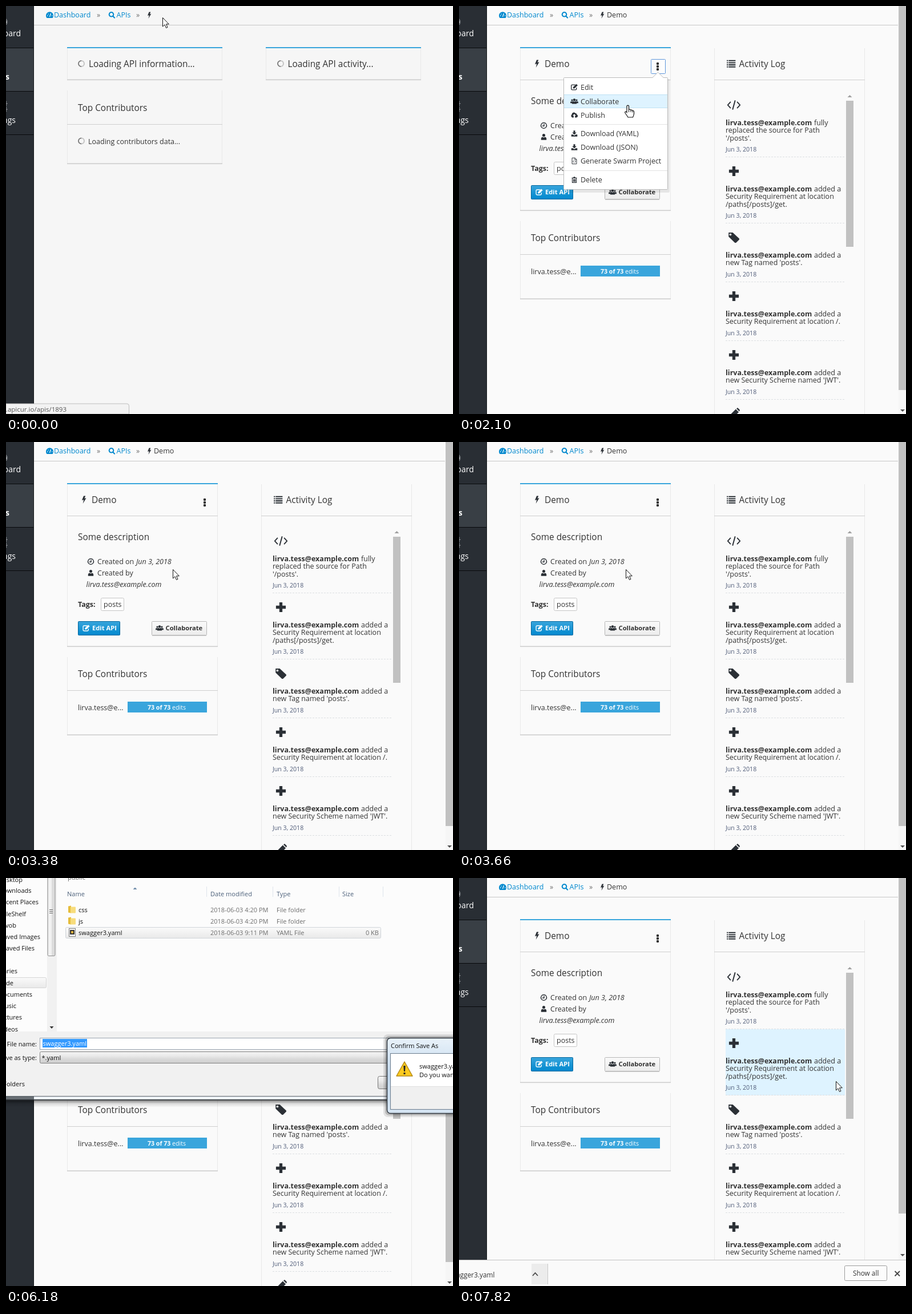
Animation, 783 px wide and 715 px high, one loop 8000 ms. Source, as an HTML page:

```html
<!DOCTYPE html>
<html lang="en">
<head>
<meta charset="utf-8">
<title>API dashboard</title>
<style>
html, body { margin: 0; width: 100%; height: 100%; overflow: hidden; background: #fafafa; }
svg { display: block; width: 783px; height: 715px; }
text { font: 12.5px "Open Sans", "Noto Sans", sans-serif; fill: #333; white-space: pre; }
.h { font-size: 15.4px; }
.b { font-weight: 700; }
.i { font-style: italic; }
.btn { font-size: 11.2px; font-weight: 700; }
.date { font-size: 10.6px; fill: #4f5b78; }
.url { font-size: 11.5px; fill: #555; }
.bar { font-size: 11.8px; }
.edits { font-size: 10.6px; }
.link { fill: #0088ce; }
.win { font-size: 11px; fill: #111; }
.dim { fill: #6d6d6d; }
.col { fill: #4c607a; }
.white { fill: #fff; }
.side { font-size: 14px; fill: #fff; }
.end { text-anchor: end; }
</style>
</head>
<body>
<svg id="stage" viewBox="0 0 783 715"></svg>
<script>
(() => {
const LOOP = 8000;
const EMAIL = 'lirva.tess@example.com';
const DARK = '#292e34', BLUE = '#39a5dc', INK = '#2b3036';

const text = (x, y, s, cls = '') => `<text x="${x}" y="${y}" class="${cls}">${s}</text>`;
const rect = (x, y, w, h, fill, more = '') => `<rect x="${x}" y="${y}" width="${w}" height="${h}" fill="${fill}" ${more}/>`;
const box = (x, y, w, h, fill, stroke, r = 0) => rect(x + .5, y + .5, w - 1, h - 1, fill, `stroke="${stroke}" rx="${r}"`);
const path = (d, fill, more = '') => `<path d="${d}" fill="${fill}" ${more}/>`;
const group = (id, body) => `<g id="${id}">${body}</g>`;
const gradient = (id, ...colors) => `<linearGradient id="${id}" x2="0" y2="1">${colors.map((c, i) =>
  `<stop offset="${i / (colors.length - 1)}" stop-color="${c}"/>`).join('')}</linearGradient>`;

// Icons are drawn around 0,0 in a box of about 14 units.
const line = (d, w = 1.6) => `<path d="${d}" fill="none" stroke="currentColor" stroke-width="${w}"/>`;
const solid = d => `<path d="${d}" fill="currentColor"/>`;
const person = (x, s) => `<g transform="translate(${x}) scale(${s})">${solid('M-3-3.5a3 3 0 1 1 6 0a3 3 0 1 1-6 0M-5.5 6V3Q-5 0-2.5 0Q0 2 2.5 0Q5 0 5.5 3V6Z')}</g>`;
const ICONS = {
  bolt: solid('M-.5-6.5L-3.5 1L-.3.3L-1.8 7L4-2.8L.9-2.2L2.8-6.5Z'),
  list: solid('M-7-6h2v2h-2zM-7-2.5h2v2h-2zM-7 1h2v2h-2zM-7 4.5h2v2h-2zM-4-6H7.5v2H-4zM-4-2.5H7.5v2H-4zM-4 1H7.5v2H-4zM-4 4.5H7.5v2H-4z'),
  code: line('M-4.5-4.5L-8.5 0L-4.5 4.5M4.5-4.5L8.5 0L4.5 4.5M1.8-6.5L-1.8 6.5', 1.5),
  plus: solid('M-2-6.5H2V-2H6.5V2H2V6.5H-2V2H-6.5V-2H-2Z'),
  tag: solid('M-7-6.5H-1.5L7 1.5Q7.5 2.3 7 3L3 7Q2 7.5 1.2 7L-7-1ZM-4.6-5.2a1.4 1.4 0 1 0 .01 0Z'),
  pencil: solid('M-7 7L-6 2.5L2.5-6L6.5-2L-2 6ZM3.4-6.8L5-8L8-5L7.2-3Z'),
  clock: line('M0-5a5 5 0 1 0 .01 0M.5-3V.8H-2.5', 1.4),
  user: person(0, .95),
  users: person(-4.5, .62) + person(4.5, .62) + person(0, .85),
  edit: line('M2-4.5H-4Q-6-4.5-6-3V4Q-6 5.5-4 5.5H2.5Q4.2 5.5 4.2 4V1', 1.5) + solid('M-2.5 2.8V.2L4-6L6.8-3.4L.3 2.8Z'),
  cloud: solid('M-4 5A3.4 3.4 0 0 1-5-1A4 4 0 0 1 2.2-3.5A2.7 2.7 0 0 1 5-.8A3 3 0 0 1 4 5H1.3V1.5H3.3L0-2L-3.3 1.5H-1.3V5Z'),
  down: solid('M-1.7-6H1.7V-2H4.4L0 2.4L-4.4-2H-1.7ZM-6 2H-2.8L0 4L2.8 2H6V6H-6Z'),
  file: line('M-4.5-6H1.5L4.5-3V6H-4.5ZM1-6V-2.5H4.5M-1-.8L-2.7 1.2L-1 3.2M1-.8L2.7 1.2L1 3.2', 1.1),
  trash: line('M-4-2.8V5.5H4V-2.8M-1.6-1.5V4M.1-1.5V4M1.8-1.5V4', 1.3) + solid('M-5-4.2H-2L-1.3-6H1.3L2-4.2H5V-2.8H-5Z'),
  gauge: solid('M-5 5A6.5 6.5 0 1 1 5 5Z') + '<path d="M0 3L2-3M-4.4 1h1.5M-3-2.4l1 1M3.6 1h1.3" stroke="#fafafa" stroke-width="1.3"/>',
  search: line('M-1-5a3.8 3.8 0 1 0 .01 0M1.8 1.8L5.2 5.2', 2),
  gear: line('M-4 0a4 4 0 1 0 8 0a4 4 0 1 0-8 0', 3) + line('M0-7V-4M0 4V7M4 0H7M3-3L5-5M3 3L5 5', 2.5)
};
const icon = (name, x, y, s = 1, color = INK) => `<g transform="translate(${x} ${y}) scale(${s})" color="${color}">${ICONS[name]}</g>`;

const card = (x, y, w, bottom, split, accent) =>
  path(`M${x + .5} ${y}V${bottom}M${x + w - .5} ${y}V${bottom}`, 'none', 'stroke="#e9e9e9"') +
  rect(x, split, w, 1, '#cfcfcf') + rect(x, bottom - .5, w, 1.6, '#cdcdcd') +
  (accent ? rect(x, y, w, 2, BLUE) : '');

const sidebar = rect(0, 0, 49, 715, DARK) + rect(0, 74, 48, 75, '#393f45') +
  [73, 149, 225].map(y => rect(0, y, 48, 1, '#07090b')).join('') + rect(48, 0, 1, 715, '#15181b') +
  icon('gauge', -5, 27, 1.2, '#72767b') + icon('gear', -3, 171, .8, '#72767b') + icon('gear', -3, 181, .8, '#72767b') +
  text(26, 53, 'Dashboard', 'side end') + text(6, 129, 'APIs', 'side end b') + text(17, 205, 'Settings', 'side end');

const crumbs = icon('gauge', 76.5, 16, 1, '#0088ce') + text(84, 20, 'Dashboard', 'link') + text(159, 20, '»', 'dim') +
  icon('search', 185.5, 16, 1, '#0088ce') + text(193.5, 20, 'APIs', 'link') + text(228, 20, '»', 'dim') + icon('bolt', 251, 16, .85);

const spinner = (x, y) => `<g transform="translate(${x} ${y})"><g class="spin"><circle r="5" fill="none" stroke="#c4c4c4" stroke-width="2"/>
  <path d="M0-5A5 5 0 0 0 0 5" fill="none" stroke="#777" stroke-width="1.6"/></g></g>`;

const loading = rect(49, 0, 734, 715, '#f6f6f6') + rect(49, 33, 734, 1, '#c6c6c6') + crumbs +
  card(107, 72, 272, 129, 129, true) + card(455, 72, 272, 129, 129, true) + card(107, 148, 272, 276, 207) +
  spinner(132, 101) + text(145, 106.5, 'Loading API information...', 'h') +
  spinner(481, 101) + text(493.5, 106.5, 'Loading API activity...', 'h') +
  text(126, 183.5, 'Top Contributors', 'h') + spinner(132, 236.5) + text(144, 241.5, 'Loading contributors data...');

const LOG = [
  ['code', 'fully', 'replaced the source for Path', "'/posts'."],
  ['plus', 'added a', 'Security Requirement at location', '/paths[/posts]/get.'],
  ['tag', 'added a', "new Tag named 'posts'."],
  ['plus', 'added a', 'Security Requirement at location /.'],
  ['plus', 'added a', "new Security Scheme named 'JWT'."],
  ['pencil', 'added a', 'new Path.']
];
let nextY = 149;
const log = LOG.map(([name, verb, ...lines]) => {
  const y = nextY, last = y + 60 + lines.length * 13.4;
  nextY = Math.round(last + 29.5);
  return icon(name, 481.5, y + 24.5, name === 'code' ? 1.25 : 1.32) +
    text(467, y + 60, EMAIL, 'b') + text(622, y + 60, verb) +
    lines.map((s, i) => text(467, y + 60 + (i + 1) * 13.4, s)).join('') +
    text(467, last + 19.5, 'Jun 3, 2018', 'date') +
    path(`M467 ${nextY - .5}H676`, 'none', 'stroke="#dcdfe2" stroke-dasharray="3 2"');
}).join('');

const page = rect(49, 0, 734, 715, '#fafafa') + rect(49, 33, 720, 1, '#c6c6c6') + crumbs + text(259, 20, 'Demo') +
  card(107, 72, 264, 358, 129, true) + card(107, 377, 264, 513, 435) + card(447, 74, 264, 760, 129) +
  icon('bolt', 136.5, 101) + text(150, 106.5, 'Demo', 'h') + text(126, 172, 'Some description', 'h') +
  icon('clock', 148.5, 209.5) + text(160, 213.5, 'Created on') + text(228, 213.5, 'Jun 3, 2018', 'i') +
  icon('user', 148.5, 229.5, .9) + text(160, 233.5, 'Created by') + text(140.5, 253.5, EMAIL, 'i') +
  text(126, 289, 'Tags:', 'b') + box(166, 273, 41, 23, '#fff', '#c4c4c4', 2) + text(171, 289, 'posts') +
  box(126, 314, 74, 25, 'url(#blue)', '#00659c', 1) + icon('edit', 140.5, 326, .9, '#fff') + text(151, 330, 'Edit API', 'btn white') +
  box(255, 314, 97, 25, 'url(#grey)', '#b7b7b7', 1) + rect(256, 339, 95, 1, '#ccc') + icon('users', 269, 326, .88) + text(279.5, 330, 'Collaborate', 'btn') +
  text(126, 411.5, 'Top Contributors', 'h') + text(126, 469.5, EMAIL.slice(0, 12) + '...') +
  rect(213, 455, 139, 19, BLUE) + text(248, 468.5, '<tspan class="b">73 of 73</tspan> edits', 'edits white') +
  icon('list', 476.5, 101, 1.05) + text(490.5, 106.5, 'Activity Log', 'h') +
  group('logHover', rect(467, 265, 209, 116, '#def3ff')) + log +
  path('M680.5 160L684.5 156L688.5 160Z', '#a0a0a0') + rect(678, 166, 13, 256, '#c1c1c1') +
  group('focus', box(336, 93, 26, 26, '#fdfdfd', '#5e96db', 1)) +
  [100, 105, 110].map(y => rect(346, y - 1, 4, 4, '#222', 'rx="1"')).join('') +
  rect(770, 0, 13, 715, '#f6f6f6') + group('thumb', rect(770, 0, 13, 673, '#c1c1c1')) +
  group('arrow', path('M773 707H781L777 711Z', '#505050'));

const MENU = [['edit', 'Edit', 142], ['users', 'Collaborate', 167], ['cloud', 'Publish', 191], ['down', 'Download (YAML)', 223.5],
  ['down', 'Download (JSON)', 247.5], ['file', 'Generate Swarm Project', 271.5], ['trash', 'Delete', 304.5]];
const menu = rect(185, 128, 184, 199, '#000', 'opacity=".08" rx="2"') + box(183, 125, 183, 197, '#fff', '#bbb', 1) +
  path('M338.5 126L348.5 116L358.5 126', '#fff', 'stroke="#bbb"') + rect(339, 126, 19, 2, '#fff') +
  group('menuHover', rect(184, -12, 181, 24, '#def3ff') + rect(184, -12, 181, 1, '#bee1f4') + rect(184, 11, 181, 1, '#bee1f4')) +
  rect(184, 207, 181, 1, '#e2e2e2') + rect(184, 288, 181, 1, '#e2e2e2') +
  MENU.map(([name, s, y]) => icon(name, 202, y, .88) + text(213, y + 4.5, s)).join('');

const linkBar = path('M0 697H212Q215.5 697 215.5 701V715H0Z', '#f3f3f3', 'stroke="#bdbdbd"') +
  group('url', text(106, 711, 'studio.apicur.io/apis/1893', 'url end'));

const PLACES = [['Desktop', 29, 6.5], ['Downloads', 44.5, 26], ['Recent Places', 57, 46], ['FileShelf', 35, 66.5], ['vob', 18, 87],
  ['Saved Images', 60, 107], ['Saved Files', 50, 127], ['Libraries', 20, 167], ['Code', 13, 188], ['Documents', 46, 208],
  ['Music', 18, 228], ['Pictures', 28, 248], ['Videos', 21, 268.5]];
const folder = y => path(`M109 ${y - 6}L114 ${y - 7}V${y + 6}L109 ${y + 5}Z`, '#e6bd3c') + rect(113, y - 5, 9, 11, '#f7dc7c', 'rx="1"');
const row = (y, name, when, kind) => text(127, y + 4, name, 'win') + text(358, y + 4, when, 'win dim') + text(474, y + 4, kind, 'win dim');
const files = text(108, 2.5, 'public', 'win dim') + folder(55.5) + folder(75.5) +
  group('picked', box(104, 86, 553, 20, 'url(#pick)', '#d0d5da', 2)) +
  row(55.5, 'css', '2018-06-03 4:20 PM', 'File folder') + row(75.5, 'js', '2018-06-03 4:20 PM', 'File folder') +
  box(110, 88, 12, 15, '#fff', '#777') + rect(112, 91, 8, 8, '#333') + rect(114, 93, 4, 4, '#e2b13c') +
  row(96, 'swagger3.yaml', '2018-06-03 9:11 PM', 'YAML File') + text(653, 100, '0 KB', 'win dim end');
const noFiles = text(108, 2.5, 'geek', 'win dim') + text(396, 65.5, 'No items match your search.', 'win dim');
const fileName = (s, w) => rect(64, 282, w, 15, '#3399ff') + text(64.5, 293.5, s, 'win white');

const dialog = rect(0, 389, 783, 13, 'url(#shade)') + rect(0, 0, 783, 383, '#fcfcfc') + rect(0, 269, 783, 113, '#f1f1f1') +
  box(-5, 174, 76, 19, 'url(#pick)', '#d5d5d5', 2) + PLACES.map(([s, x, y]) => text(x, y, s, 'win end')).join('') +
  rect(72, 0, 17, 269, '#f1f1f1') + box(72.5, -5, 14, 142, '#dcdcdc', '#8e8e8e', 2) + rect(74, 0, 6, 136, '#f1f1f1') +
  [55, 58, 61].map(y => rect(76, y, 6, 1, '#666')).join('') + path('M76.5 260H83.5L80 264Z', '#333') +
  [351, 467, 583, 660].map(x => rect(x, 15, 1, 18, '#dfe5ec')).join('') + path('M222.5 20L226 16.5L229.5 20Z', '#6d8aa8') +
  text(107, 31.5, 'Name', 'win col') + text(358, 31.5, 'Date modified', 'win col') + text(474, 31.5, 'Type', 'win col') + text(589, 31.5, 'Size', 'win col') +
  group('noFiles', noFiles) + group('files', files) +
  text(54, 294.5, 'File name:', 'win end') + text(54, 318.5, 'Save as type:', 'win end') + text(33, 365, 'Hide Folders', 'win end') +
  box(59, 280, 740, 21, '#fff', '#9aa5b0') + box(59, 304, 740, 21, 'url(#combo)', '#808080', 2) + text(62.5, 318.5, '*.yaml', 'win') +
  group('nameA', fileName('Demo.yaml', 60)) + group('nameB', fileName('swagger3.yaml', 78)) +
  box(651, 347, 83, 23, 'url(#combo)', '#777', 3) + group('glow', rect(652.5, 348.5, 80, 20, 'none', 'stroke="#3cbbe4" stroke-width="2" rx="2"')) +
  text(681, 362, 'Save', 'win') + box(747, 347, 83, 23, 'url(#combo)', '#777', 3) + text(772, 362, 'Cancel', 'win') +
  rect(0, 382, 783, 1, '#596068') + rect(0, 383, 783, 5, '#edf2f7') + group('active', rect(0, 383, 783, 5, '#a9cbe6')) + rect(0, 388, 783, 1.5, '#30353a') +
  rect(0, 383, 49, 5, '#23292f', 'opacity=".65"');

const confirmBox = rect(661, 274, 130, 145, '#000', 'opacity=".1" rx="8"') + rect(664, 277, 130, 139, '#000', 'opacity=".18" rx="7"') +
  rect(667.5, 280.5, 130, 132, 'url(#glass)', 'stroke="#2f363e" stroke-width="1.5" rx="6"') +
  box(673, 307, 130, 99, '#f0f0f0', '#6b7c8d') + rect(674, 308, 120, 57, '#fff') + rect(674, 365, 120, 1, '#dfdfdf') +
  text(674, 297.5, 'Confirm Save As', 'win') +
  path('M698 322L712 347H684Z', '#fdca1e', 'stroke="#b58a18" stroke-linejoin="round" stroke-width="1.5"') +
  path('M696.3 329H699.7L699 339H697ZM696.5 341H699.5V344H696.5Z', '#222') +
  text(724, 334, 'swagger3.yaml already exists.', 'win') + text(724, 348.5, 'Do you want to replace it?', 'win');

const downloads = rect(0, 670, 783, 45, '#fafafa') + rect(0, 669, 783, 1, '#c3c3c3') + rect(127, 676, 28, 36, '#ececec') + rect(155, 676, 1, 36, '#c8c8c8') +
  text(62.5, 700, 'swagger3.yaml', 'bar end') + path('M129 697L133.5 692L138 697', 'none', 'stroke="#444" stroke-width="1.7"') +
  box(675, 679, 75, 27, '#fcfcfc', '#9c9c9c', 2) + text(690, 697, 'Show all', 'bar') +
  path('M763.5 689L772 697.5M772 689L763.5 697.5', 'none', 'stroke="#444" stroke-width="1.8"');

const pointer = path('M.5.5V16L4 12.7L6.5 18.5L9 17.4L6.5 11.8H11.3Z', '#fff', 'stroke="#111"');
const hand = path('M-2 1.2Q0-.8 1.5 1.2V7.5L3 7Q4.5 7 5 8.5Q7 7.5 8 9.5Q10.5 9 10.5 11.5V15Q10 18 8.5 21H0Q-2 17.5-5 13.5Q-6 11-3.5 11L-2 12.5Z', '#fff', 'stroke="#111" stroke-width="1.2"') +
  path('M1.5 7V12M5 8.5V12M8 9.5V12.5', 'none', 'stroke="#111"');

document.getElementById('stage').innerHTML = '<defs>' + gradient('blue', BLUE, '#0088ce') + gradient('grey', '#fafafa', '#ececec') +
  gradient('combo', '#f3f3f3', '#ebebeb', '#d8d8d8', '#cfcfcf') + gradient('pick', '#fafafa', '#e9e9e9') +
  gradient('glass', '#e9f2fa', '#c2d8ec', '#d6e5f3') + gradient('shade', 'rgba(0,0,0,.5)', 'rgba(0,0,0,.12)', 'rgba(0,0,0,0)') + '</defs>' +
  group('page', page) + group('loading', loading) + sidebar + group('menu', menu) + group('linkBar', linkBar) +
  group('dialog', dialog) + group('confirm', confirmBox) + group('downloads', downloads) +
  group('cursor', group('ring', '<circle r="9.5" fill="none" stroke="#111" stroke-width="1.5"/>') + group('pointer', pointer) + group('hand', hand));

const $ = id => document.getElementById(id);
const spins = document.querySelectorAll('.spin');
const show = (id, on) => { $(id).style.display = on ? '' : 'none'; };
const shift = (id, x, y) => $(id).setAttribute('transform', `translate(${x} ${y})`);

// Moves: first step, last step, number of steps, end point.
const MOVES = [[130, 1130, 8, 347, 104], [1690, 2100, 4, 296, 174], [2240, 2660, 4, 294, 222], [2800, 2800, 1, 291.5, 222.5],
  [3810, 4100, 3, 225, 189], [5470, 5470, 1, 160, 92], [5820, 6000, 2, 692, 356], [6180, 6180, 1, 830, 390], [6970, 7820, 7, 660, 356]];
function cursorAt(t) {
  let x = 274, y = 20;
  for (const [start, end, steps, tx, ty] of MOVES) {
    if (t < start) break;
    const p = end > start ? Math.min(1, (Math.floor((t - start) / (end - start) * (steps - 1) + 1e-6) + 1) / steps) : 1;
    x += (tx - x) * p;
    y += (ty - y) * p;
  }
  return [x, y];
}

function render(t) {
  const within = (a, b) => t >= a && t < b;
  const [x, y] = cursorAt(t);
  const loaded = t >= 420, bar = t >= 7250, menuOpen = within(1280, 2800), pointing = within(1130, 2800);

  show('loading', !loaded);
  show('page', loaded);
  spins.forEach(s => s.setAttribute('transform', `rotate(${Math.floor(t / 140) * 50})`));
  show('linkBar', t < 270 || within(2800, 3230));
  show('url', t < 270);

  const item = MENU.find(m => Math.abs(m[2] - y) <= 12);
  show('focus', pointing);
  show('menu', menuOpen);
  show('menuHover', item);
  if (item) shift('menuHover', 0, item[2]);

  show('dialog', within(3670, 6970));
  show('noFiles', t < 5470);
  show('files', t >= 5470);
  show('picked', t >= 5650);
  show('nameA', t < 5650);
  show('nameB', t >= 5650);
  show('active', t < 6180);
  show('glow', t < 6180);
  $('glow').style.opacity = .8 + .2 * Math.cos((t - 4500) / 1000 * Math.PI);
  show('confirm', within(6180, 6830));

  show('downloads', bar);
  $('thumb').setAttribute('transform', `scale(1 ${bar ? 588 / 673 : 1})`);
  shift('arrow', 0, bar ? -48 : 0);
  show('logHover', t > 6970 && x > 467 && x < 676 && y > 265 && y < 381);

  show('ring', within(1130, 1280));
  show('hand', pointing);
  show('pointer', !pointing);
  shift('cursor', Math.round(x), Math.round(y));
}

const begin = performance.now();
function tick() {
  render((performance.now() - begin) % LOOP);
  requestAnimationFrame(tick);
}
tick();
})();
</script>
</body>
</html>
```
